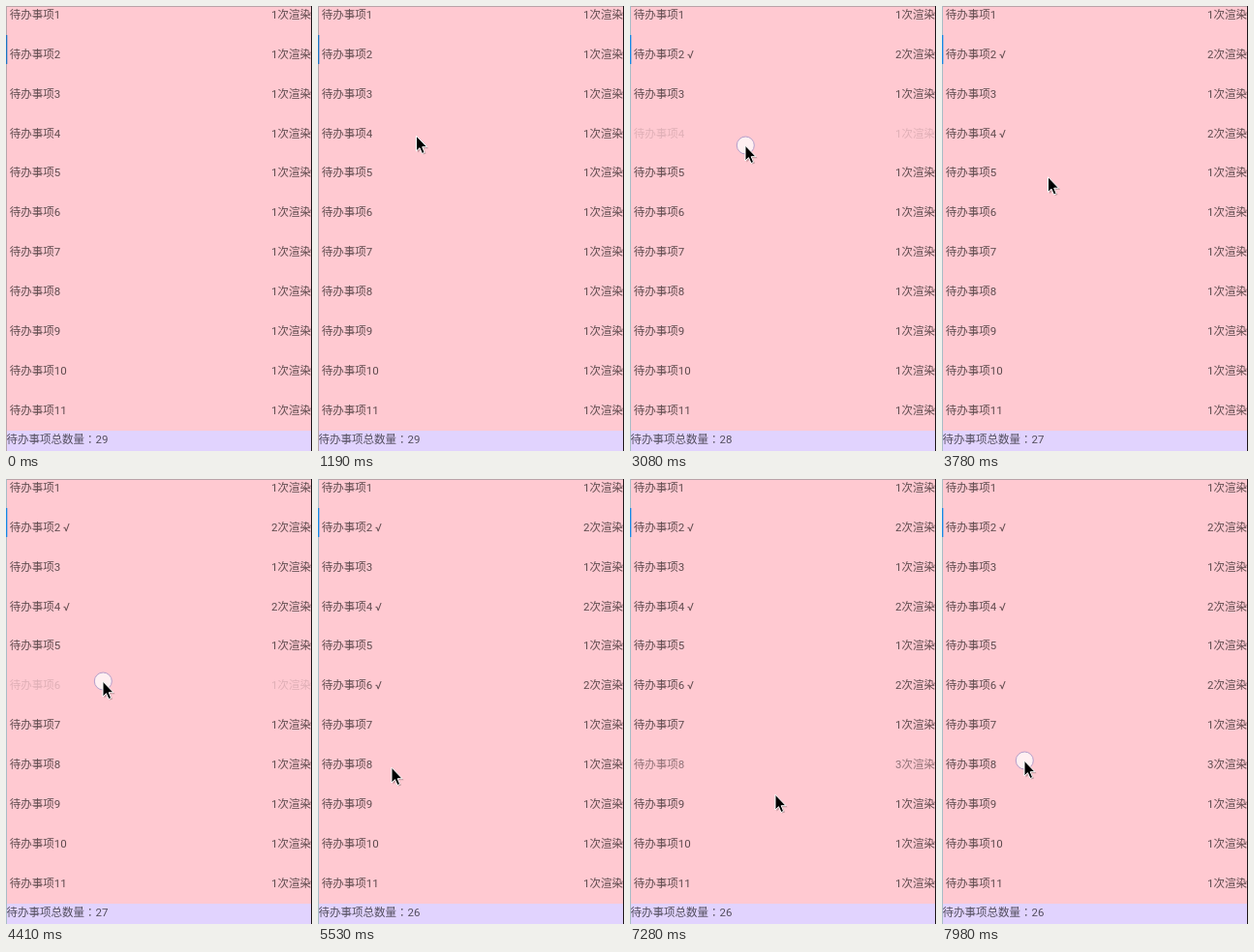
Animation, 316 px wide and 460 px high, one loop 8 s. Source, as an HTML page:

```html
<!DOCTYPE html>
<html lang="zh-CN">
<head>
<meta charset="utf-8">
<title>待办事项</title>
<style>
  html, body { margin: 0; width: 100%; height: 100%; overflow: hidden; background: #ffc9d1; }
  svg { display: block; }
  text {
    font: 11.5px Roboto, "Noto Sans CJK SC", "Noto Sans CJK", sans-serif;
    fill: rgba(0, 0, 0, .63);
    white-space: pre;
  }
  #total { font-family: Roboto, "Noto Sans CJK JP", "Noto Sans CJK", sans-serif; }
</style>
</head>
<body>
<svg width="316" height="460" viewBox="0 0 316 460">
  <rect width="316" height="460" fill="#ffc9d1"/>
  <rect y="439" width="316" height="21" fill="#e1d3fe"/>
  <g id="list"></g>
  <text id="total" lang="ja" x="0.6" y="451.6"></text>
  <rect width="316" height="1" fill="#b9a3a8"/>
  <rect id="edge" width="1" height="460"/>
  <rect id="bar" y="30" width="1.3" height="30"/>
  <rect x="315" width="1" height="460" fill="#1c1518"/>
  <circle id="touch" r="9" cx="0.3" cy="1" fill="#fff" fill-opacity=".72" stroke="#b49fcb"/>
  <g id="cursor">
    <path d="M1.5 3V18.5L5 15.2L7.4 20.6L10 19.4L7.6 14.2H12.6Z" fill="#000" opacity=".25"/>
    <path d="M0 1.2V17L3.5 13.7L6 19.5L8.6 18.4L6.2 12.7H11Z" fill="#000" stroke="#fff"/>
  </g>
</svg>
<script>
const LOOP = 8000, STEP = 70, ROWS = 11, PITCH = 40.9;
const FADE_IN = 150, FADE_OUT = 250, DIM = 0.2;

// each glide: start time, end time, x, y to reach
const entry = [31, 202];
const glides = [
  [700, 1400, 126, 109],
  [1400, 1750, 110.5, 80],
  [2310, 2870, 119, 143],
  [3430, 4130, 100, 208],
  [4620, 5530, 76, 297],
  [5530, 5670, 80, 290.5],
  [6090, 6580, 86, 319],
  [7000, 7280, 150, 325],
  [7280, 7560, 92.5, 319],
  [7630, 7910, 85, 290]
];

const $ = id => document.getElementById(id);
const clamp = v => Math.max(0, Math.min(1, v));
const easeQuad = p => p < 0.5 ? 2 * p * p : 1 - 2 * (1 - p) * (1 - p);
const smooth = p => p * (1 + 3 * p - 2 * p * p) / 2;

function pointerAt(t) {
  return glides.reduce(([x, y], [from, to, toX, toY]) => {
    const p = smooth(clamp((t - from) / (to - from)));
    return [x + (toX - x) * p, y + (toY - y) * p];
  }, entry);
}

// press and release times; the row is the one under the pointer
const taps = [
  [1870, 2100], [2900, 3220], [4180, 4480],
  [5700, 5950], [6700, 7140], [7975, 8200]
].map(([down, up]) => ({ down, up, row: Math.floor(pointerAt(down)[1] / PITCH) }));

function addText(x, y, anchor) {
  const el = document.createElementNS("http://www.w3.org/2000/svg", "text");
  el.setAttribute("x", x);
  el.setAttribute("y", y);
  el.setAttribute("text-anchor", anchor);
  $("list").append(el);
  return el;
}

const rows = Array.from({ length: ROWS }, (_, i) => {
  const y = 12.8 + PITCH * i;
  return { label: addText(3.7, y, "start"), count: addText(315, y, "end") };
});

function setText(el, s) {
  if (el.textContent !== s) el.textContent = s;
}

function dimming(t, { down, up }) {
  const p = t < up
    ? 1 - easeQuad(clamp((t - down) / FADE_IN))
    : easeQuad(clamp((t - up) / FADE_OUT));
  return DIM + (1 - DIM) * p;
}

function touchOpacity(t) {
  const tap = taps.find(({ down, up }) => t >= down && t < up + 80);
  return tap ? clamp((tap.up + 80 - t) / 150) : 0;
}

function draw(t) {
  let open = 29;
  rows.forEach(({ label, count }, i) => {
    const own = taps.filter(tap => tap.row === i);
    const toggles = own.filter(tap => t >= tap.up).length;
    const done = toggles % 2;
    open -= done;
    setText(label, `待办事项${i + 1}${done ? " √" : ""}`);
    setText(count, `${toggles + 1}次渲染`);
    label.style.opacity = count.style.opacity = Math.min(1, ...own.map(tap => dimming(t, tap)));
  });
  setText($("total"), `待办事项总数量：${open}`);

  // the window gains focus with the first press
  const focused = t >= taps[0].down;
  $("edge").setAttribute("fill", focused ? "#a9bcc6" : "#b5a5ab");
  $("bar").setAttribute("fill", focused ? "#1088e6" : "#1874c4");

  const move = `translate(${pointerAt(t)})`;
  $("cursor").setAttribute("transform", move);
  $("touch").setAttribute("transform", move);
  $("cursor").style.opacity = t < glides[0][0] ? 0 : 1;
  $("touch").style.opacity = touchOpacity(t);
}

const start = performance.now();
function tick() {
  const t = (performance.now() - start) % LOOP;
  draw(Math.floor(t / STEP) * STEP);
  requestAnimationFrame(tick);
}
draw(0);
requestAnimationFrame(tick);
</script>
</body>
</html>
```
